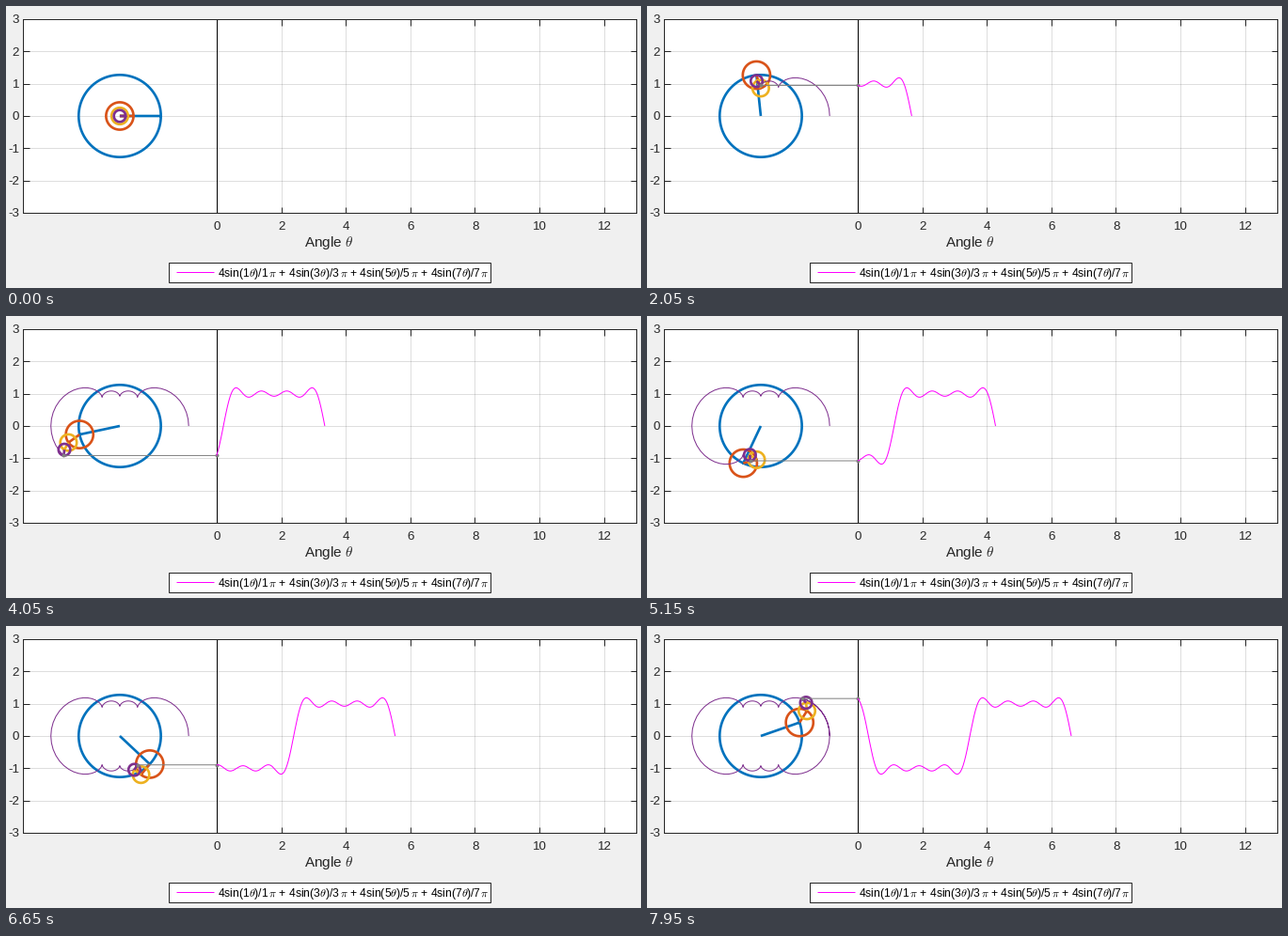
A matplotlib script for the animation above (8000 ms loop, 675 by 300 pixels).

```python
import numpy as np
import matplotlib.pyplot as plt
from matplotlib.animation import FuncAnimation
from matplotlib.patches import Rectangle

W, H, DPI = 675, 300, 100
LEFT, TOP, WIDE, HIGH = 18, 14, 652, 206  # plot area in pixels
FRAMES, INTERVAL = 160, 50
STEP = 2 * np.pi / 150
HUB = -3.0
HARMONICS = np.array([1, 3, 5, 7])
RADII = 4 / (np.pi * HARMONICS)
COLORS = ["#0072bd", "#d95319", "#edb120", "#7e2f8e"]
INK = (0.15, 0.15, 0.15)
PX = 72 / DPI  # points per pixel

plt.rcParams.update({
    "font.family": "Liberation Sans",
    "mathtext.fontset": "cm",
    "lines.solid_capstyle": "butt",
    "lines.solid_joinstyle": "round",
})

fig = plt.figure(figsize=(W / DPI, H / DPI), dpi=DPI, facecolor="#f0f0f0")
ax = fig.add_axes([LEFT / W, 1 - (TOP + HIGH) / H, WIDE / W, HIGH / H])
ax.set(xlim=(-6, 13), ylim=(-3, 3), facecolor="white")
ax.set_xticks(range(0, 13, 2))
ax.set_yticks(range(-3, 4))
ax.set_axisbelow(True)
ax.grid(color=INK, alpha=0.15, lw=PX)
ax.tick_params(direction="in", length=6.5 * PX, width=PX, color=INK,
               top=True, right=True, labelbottom=False, labelleft=False)
for spine in ax.spines.values():
    spine.set(color=INK, linewidth=PX)


def label(x, y, text, size, ha="left", color=INK):
    """Text with its baseline at pixel (x, y), measured from the top left."""
    fig.text(x / W, 1 - y / H, text, fontsize=size * PX, ha=ha,
             va="baseline", color=color)


for v in range(0, 13, 2):
    label(LEFT + 0.5 + (v + 6) * WIDE / 19, 238, str(v), 13.33, "center")
for v in range(-3, 4):
    label(14, 121.4 - v * HIGH / 6, str(v), 13.33, "right")
label(317, 256, r"Angle $\theta$", 15.2)

# Legend
fig.add_artist(Rectangle((173 / W, 1 - 294 / H), 342 / W, 21 / H,
                         transform=fig.transFigure, facecolor="white",
                         edgecolor=INK, lw=PX))
fig.add_artist(plt.Line2D([181 / W, 221 / W], [1 - 283 / H] * 2,
                          color="magenta", lw=PX))
terms = [rf"4sin({k}$\theta$)/{k}$\,\pi$" for k in HARMONICS]
label(225, 288, " + ".join(terms), 12.15, color="black")

# Moving parts
ax.plot([0, 0], [-3, 3], color="black", lw=PX)
wheels = [ax.plot([], [], color=c, lw=2.67 * PX)[0] for c in COLORS]
trace, = ax.plot([], [], color=COLORS[3], lw=PX)
beam, = ax.plot([], [], color="0.5", lw=PX, marker="o", ms=4 * PX, mew=0,
                snap=False)
wave, = ax.plot([], [], color="magenta", lw=PX)

RIM = np.linspace(0, 2 * np.pi, 101)


def tip(angle):
    """End of the arm chain as a complex number."""
    return HUB + np.exp(1j * np.outer(angle, HARMONICS)) @ RADII


def draw(i):
    angle = max(i - 1, 0) * STEP
    center = HUB + 0j
    for wheel, k, r in zip(wheels, HARMONICS, RADII):
        rim = center + r * np.exp(1j * (RIM + k * angle))
        path = np.concatenate([[center], rim])
        wheel.set_data(path.real, path.imag)
        if i > 0:  # the wheels start out concentric
            center = rim[0]

    past = np.arange(i) * STEP
    points = tip(past)
    trace.set_data(points.real, points.imag)
    wave.set_data(angle - past, points.imag)
    end = points[-1:]
    beam.set_data(np.append(end.real, 0 * end.real),
                  np.append(end.imag, end.imag))
    return [*wheels, trace, beam, wave]


anim = FuncAnimation(fig, draw, frames=FRAMES, interval=INTERVAL, repeat=True)
plt.show()
```
